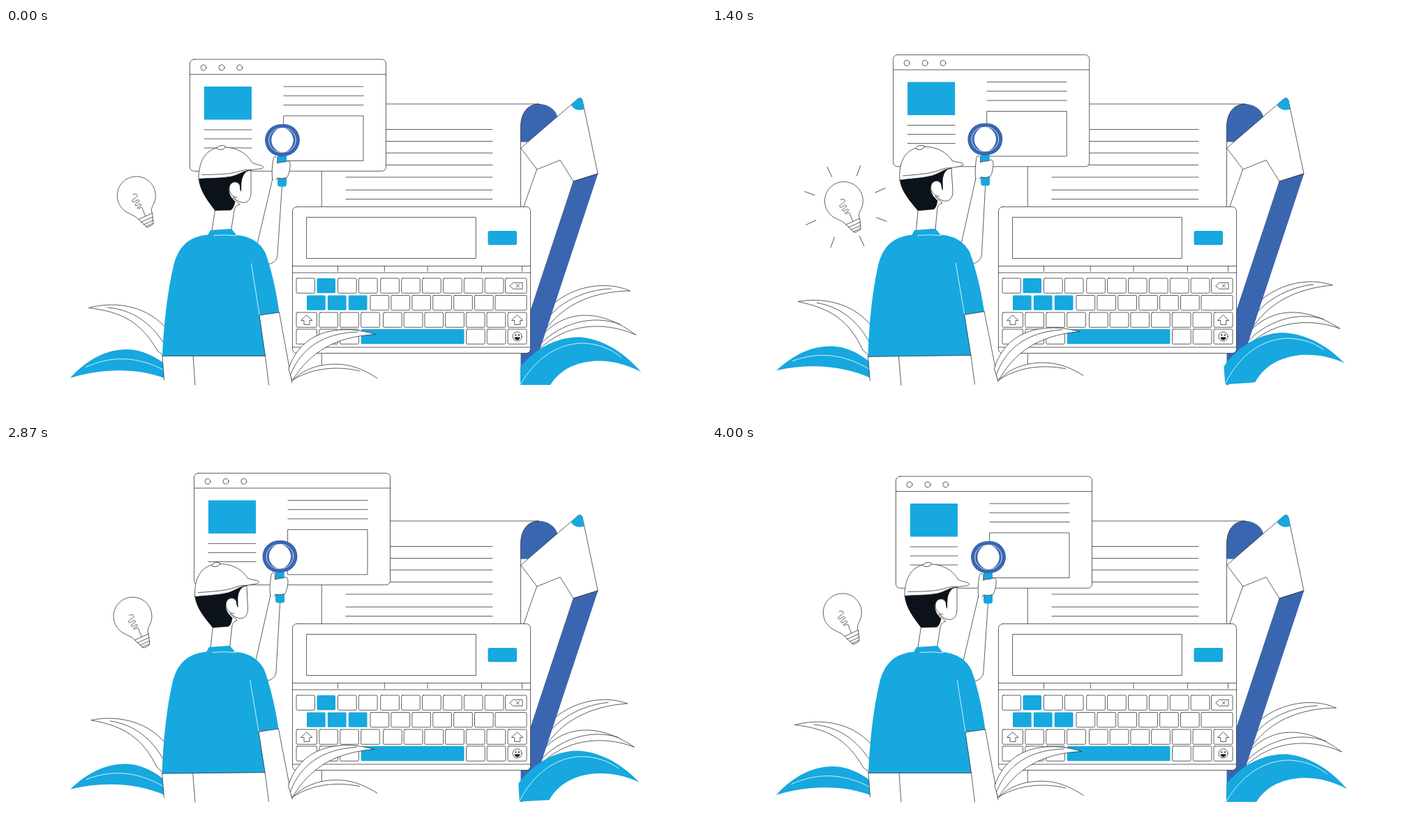
Recreate the animation shown at these times as an HTML page. Size 1003 by 558 pixels, loop 4.07 s.

```html
<!DOCTYPE html>
<html lang="en">
<head>
<meta charset="utf-8">
<title>Research desk</title>
<style>
html, body { margin: 0; width: 100%; height: 100%; overflow: hidden; background: #fff; }
svg { display: block; width: 100vw; height: 100vh; fill: #fff; stroke: #1f2226; stroke-width: .72; stroke-linecap: round; stroke-linejoin: round; }
.n { fill: none; }
.b { fill: #16a8df; }
.d { fill: #3a66b0; }
.k { fill: #0c1219; }
.p { stroke: none; }
.w { fill: none; stroke: #fff; stroke-width: .8; }
</style>
</head>
<body>
<svg viewBox="0 0 1003 558">
  <!-- page -->
  <path class="p" d="M452 109H764V487H452Z"/>
  <path class="d p" d="M737.500 163.500V141C738 120 749 109 764 109C778 109 789 119 790 128L748 163.500Z"/>
  <path class="n" d="M452.300 487V109H764C749 109 738 120 737.500 141V256M487 145.500H697M487 162.500H697M487 179.200H697M487 196.500H697M487 214H697M487 232.300H697M487 245.500H697"/>

  <g id="leafTop">
    <path d="M894 377C860 362 815 370 785 395L772 434C800 395 842 378 894 377Z"/>
    <path class="n" d="M780 412C800 389 835 375 867 374"/>
  </g>
  <g id="leafMid">
    <path d="M902 440C855 404 805 402 770 439L764 461C800 425 855 419 902 440Z"/>
    <path class="n" d="M767 452C795 424 840 410 880 425"/>
  </g>

  <!-- pencil -->
  <path d="M738 172L819 102Q824 98 826 104L848 209L813 220L752 405H737V270L760.500 203Z"/>
  <path class="d p" d="M813 220L848.300 209L766 458L740 512H737.500V448Z"/>
  <path class="n" d="M760.500 203L794 189.500L813 220L848 209"/>
  <path class="b p" d="M809.500 110.500L819 101.500Q824 98 826 104L828.500 116.500Q816 120.500 809.500 110.500Z"/>

  <!-- keyboard -->
  <rect x="410.500" y="256.500" width="341" height="210" rx="6"/>
  <rect x="431" y="271.500" width="242.300" height="59"/>
  <rect class="b p" x="690.500" y="291" width="41.500" height="20.300" rx="2.500"/>
  <path class="n" d="M410.500 341.500H751.500M410.500 351H751.500M410.500 458H751.500M475.500 342V349M542.300 342V349M604 342V349M681.500 342V349M739.500 342V349"/>
  <g id="keys"></g>
  <path class="n" d="M722 369.700L727 365.300H740V374.300H727ZM731 367.500L735.500 372M735.500 367.500L731 372"/>
  <path id="shift" d="M431 412L439 419.500H435V425.500H427V419.500H423Z"/>
  <use href="#shift" x="301.700"/>
  <circle cx="732.600" cy="442.500" r="6.600"/>
  <circle class="k p" cx="730.300" cy="440.500" r="1.100"/>
  <circle class="k p" cx="735" cy="440.500" r="1.100"/>
  <path class="k p" d="M728.600 443.500H736.600C736 449 729 449 728.600 443.500Z"/>

  <g id="leafRight">
    <path class="b p" d="M737 486C762 455 796 442 824 443.500C860 447 890 470 910 493.500C885 480 860 476 840 478C808 481 790 496 780 512H737Z"/>
    <path class="w" d="M737.500 510.500C757 477 787 453 826 452C850 453 868 461 881 472"/>
  </g>

  <!-- browser window -->
  <g id="win">
    <rect x="263.500" y="45" width="281" height="160.300" rx="6"/>
    <path class="n" d="M263.500 66.500H544.500M284 146H352M284 159H352M284 172H352M398 84H512M398 97.200H512M398 110.500H512"/>
    <circle cx="283" cy="56.800" r="4"/>
    <circle cx="309" cy="56.800" r="4"/>
    <circle cx="334.800" cy="56.800" r="4"/>
    <rect class="b p" x="284" y="84" width="68" height="47.500"/>
    <rect x="398" y="126" width="114" height="64.500"/>
  </g>

  <!-- bulb -->
  <g id="bulb">
    <g id="rays"></g>
    <path d="M190 274.500C185 268 174 267 167.500 260A27.500 27.500 0 1 1 212 251.500C208.500 257 207.500 262 209.500 265.500L211 279.500Q211 282 208.500 283L204 285.500Q201.500 286.500 200 284Z"/>
    <path class="n" d="M190 274.500L209.500 265.500M193.500 278.500L210.300 271M197 282L211 275.800M200 285L211 280"/>
    <path class="n" d="M182 239C186 236.500 190 239 187.500 242S179.500 246 181 249S188.500 244.500 190.500 247S183 252 185 254.500S192 250 193.500 253S187 256.500 188.500 258.500S194 255.500 195 258L199.500 269.500"/>
  </g>

  <g id="leafLeft">
    <path d="M119 401.500C148 393 196 394 228 429L226 470L217 463C193 421 165 407 119 401.500Z"/>
    <path class="n" d="M146 401C182 404 208 424 226 452"/>
  </g>
  <g id="leafBlue">
    <path class="b p" d="M92 502C120 471 152 458 182 461.500C203 465 217 474 228 482V502.500C190 488 140 487 92 502Z"/>
    <path class="w" d="M114 486.500C150 470 187 470 227 491"/>
  </g>

  <!-- reader -->
  <g id="body">
    <path class="p" d="M224 470H371L363 412L391.500 408L410 509L376 512H271L226.500 504Z"/>
    <path class="n" d="M224 470L226.500 505M268 470L271 512M371.500 470L376.500 512M391.500 408L410 509"/>
    <path d="M382 216L358 318L370 339H376C384 337 388.500 333 389 325L395.500 226"/>
    <g id="head">
      <path d="M300 258L294.500 294H322L327 262Q328 254 335 253L326 244Z"/>
      <path d="M322 212L351 204V236C351 248 344 252 337 250Q330 248 326 242Z"/>
      <path class="k p" d="M276 216C277 232 288 247 299.500 262L322 261.500C326 259 327 255 328.500 249C325 246 318 238 320 229C321 221 329 219 333.500 223C336 226 334 231 337 235C338 225 335 213 347 204L300 205Z"/>
      <path d="M334.500 225C331 218 320 220 320 231C321 239 326 243 331 243"/>
      <path d="M276 216.500C276 194 284 173 308 171C331 169.500 347 182 352.500 193C358 196.500 367 196 368.700 199.500C369 202 363 202 352 203.500C339 205 335 210 323 213C308 216 290 215 276 216.500Z"/>
      <path class="n" d="M281 210.500C305 210 322 210 336 205Q343 202.500 352 203.500"/>
      <ellipse cx="308.500" cy="171.500" rx="6" ry="2.900" transform="rotate(-10 308.500 171.500)"/>
    </g>
    <path class="b p" d="M291 296.500C264 298.500 248 311 240.500 339C231 379 226 425 224 470.500H371.500L363 412L391.500 408C388 380 380 345 371.500 322C364 308 350 298 328 297Z"/>
    <path class="n" d="M224 470.500H371.500L363 412L391.500 408"/>
    <path class="b p" d="M288.500 298L293 290L323 288L330.500 297.500Z"/>
    <path class="w" d="M298 297.500Q315 296 331 298M351.500 338L363 411"/>

    <!-- magnifier -->
    <rect class="b p" x="389" y="180" width="13" height="47.500" rx="3.500"/>
    <circle class="d p" cx="394" cy="161" r="23"/>
    <circle class="d p" cx="398" cy="160.700" r="23"/>
    <circle class="w" cx="394" cy="161" r="17.300"/>
    <circle class="w" cx="398" cy="160.700" r="17.300"/>
    <ellipse class="p" cx="396" cy="160.800" rx="15.200" ry="17"/>
    <path d="M382 218C380 207 382 195 383.500 186Q386 182 389 187L388.500 194C394 191.500 400 193 404 190.500Q408 191 407 200C406 206 405 211 402.500 214.500Q395 217 389 215L387 218"/>
  </g>

  <g id="leafKeys">
    <path class="p" d="M411 505.500C428 487 455 480.500 480 482.500C500 484 518 493 532 502.500C500 485 455 485 411 505.500Z"/>
    <path class="n" d="M411 505.500C428 487 455 480.500 480 482.500C500 484 518 493 532 502.500M412 504C440 488 472 484 507 492"/>
    <path d="M529 439.500C485 425 424 430 405 489L410 506C436 465 470 443 529 439.500Z"/>
    <path class="n" d="M408 497C422 460 455 437 504 436"/>
  </g>
</svg>
<script>
const LOOP = 4070, CYCLE = 4000;
const $ = id => document.getElementById(id);

// Keys: each row is y plus [x, width, blue?]
const run = (x, n, step = 29.9, w = 26.7) => Array.from({ length: n }, (_, i) => [x + i * step, w]);
const blue = list => list.map(k => [...k, true]);
const rows = [
  [359, [[416, 26.5], [445.5, 26.5, true], ...run(475.5, 2), ...run(536.7, 6), [715.5, 30.5]]],
  [383.5, [...blue(run(431, 3)), ...run(522, 6), [701, 45]]],
  [408, [[416, 29.5], ...run(448.8, 3), ...run(540.5, 6, 29.7), [719, 27]]],
  [432, [[416, 29.5], ...run(448.8, 2), [508.8, 147.7, true], ...run(659.5, 2, 29.7), [719, 27]]]
];
$("keys").innerHTML = rows.map(([y, keys]) => keys.map(([x, w, on]) =>
  `<rect x="${x}" y="${y}" width="${w}" height="21.3" rx="1.5" ${on ? 'class="b p"' : ""}/>`).join("")).join("");

$("rays").innerHTML = Array.from({ length: 8 }, (_, i) =>
  `<path d="M47 0H62.3" transform="rotate(${20 + 45 * i})"/>`).join("");

// Drift loops: time, dx, dy
const winPath = [[0, 0, 0], [530, -3.5, -1.9], [1070, -5.5, -4.9], [1730, -1.3, -7.6],
  [2400, 3.6, -6.9], [2870, 6, -4.6], [3530, 3.2, -1.4], [4000, 0, 0]];
const bulbPath = [[0, 0, 0], [530, 2.8, 2.1], [1070, 3.5, 5.3], [1730, 0.1, 9.2],
  [2400, -4.1, 8.3], [2870, -5.3, 5.3], [3530, -2.7, 1.8], [4000, 0, 0]];

// Smooth closed curve through timed points
function along(pts, t) {
  const n = pts.length - 1;
  const at = i => {
    const lap = Math.floor(i / n), [time, x, y] = pts[i - lap * n];
    return [time + lap * CYCLE, x, y];
  };
  let i = 0;
  while (i < n - 1 && t >= pts[i + 1][0]) i++;
  const [a, b, c, d] = [at(i - 1), at(i), at(i + 1), at(i + 2)];
  const h = c[0] - b[0], u = (t - b[0]) / h;
  return [1, 2].map(k => {
    const m0 = (c[k] - a[k]) / (c[0] - a[0]) * h;
    const m1 = (d[k] - b[k]) / (d[0] - b[0]) * h;
    const s = u * u * (3 - 2 * u);
    return b[k] + (c[k] - b[k]) * s + m0 * u * (1 - u) ** 2 - m1 * u * u * (1 - u);
  });
}

// Swaying parts: degrees, pivot
const sway = {
  body: [-0.95, 297, 512], head: [-3.6, 304, 282],
  leafLeft: [6, 229, 451], leafBlue: [5.8, 227, 502],
  leafTop: [-5.4, 783, 443], leafMid: [-4.9, 769, 475],
  leafRight: [-5.1, 727, 536], leafKeys: [-2.5, 412, 508]
};

const ease = (t, from, to) => {
  const u = Math.min(1, Math.max(0, (t - from) / (to - from)));
  return u * u * (3 - 2 * u);
};
const move = (id, value) => $(id).setAttribute("transform", value);

function draw(now) {
  const t = Math.min(now % LOOP, CYCLE);
  const swing = (1 - Math.cos(2 * Math.PI * t / CYCLE)) / 2;
  for (const id in sway) {
    const [deg, x, y] = sway[id];
    move(id, `rotate(${deg * swing} ${x} ${y})`);
  }
  move("win", `translate(${along(winPath, t)})`);
  move("bulb", `translate(${along(bulbPath, t)})`);
  const glow = ease(t, 300, 900) - ease(t, 2080, 2720);
  move("rays", `translate(189.4 248.4) scale(${glow})`);
  $("rays").style.display = glow > 0.01 ? "" : "none";
}

function tick() {
  draw(performance.now());
  requestAnimationFrame(tick);
}
tick();
</script>
</body>
</html>
```
